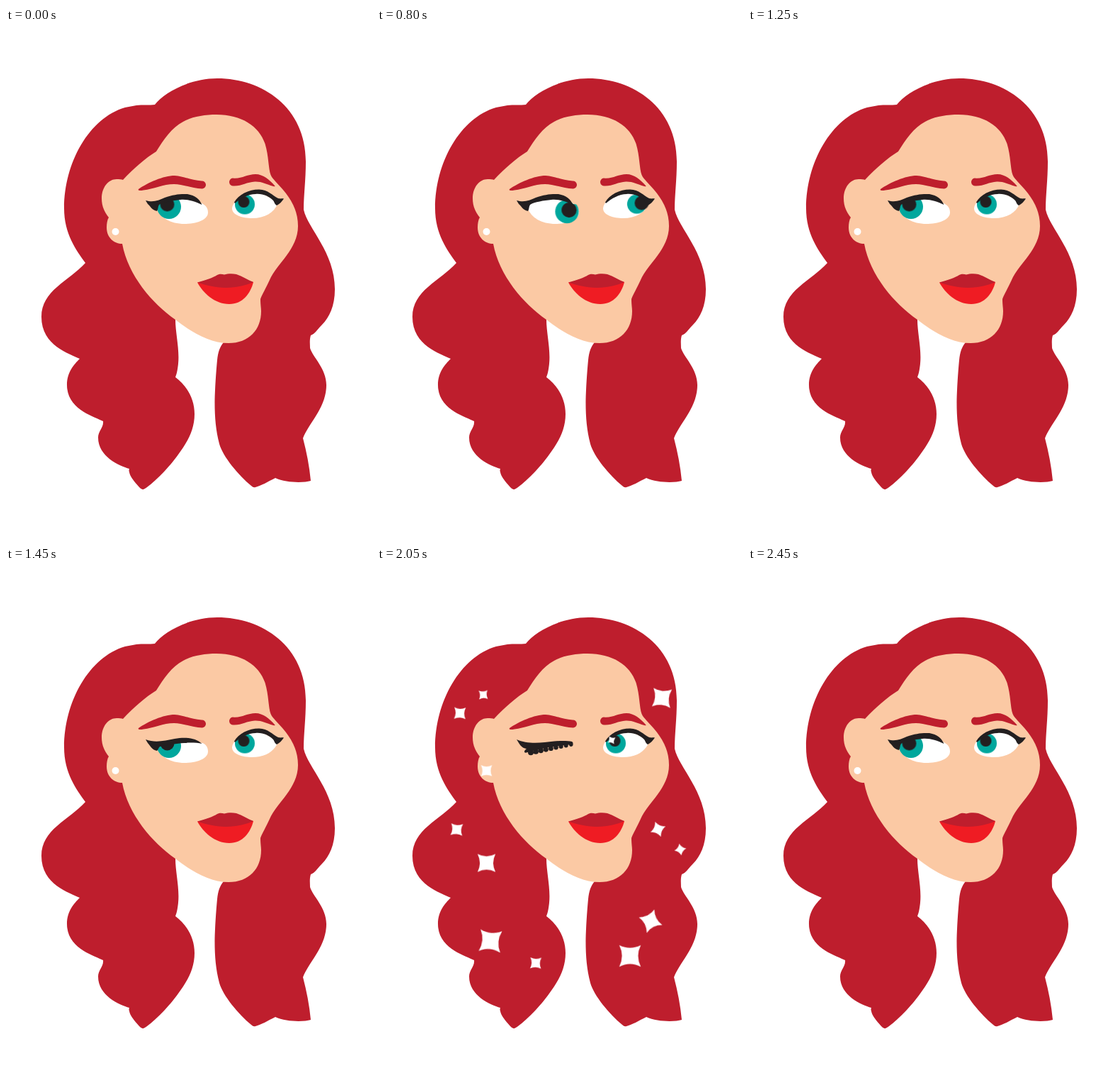
An HTML page that plays this animation: 515 px wide and 720 px high, repeating every 2.65 s.

```html
<!DOCTYPE html>
<html lang="en">
<head>
<meta charset="utf-8">
<title>Wink</title>
<style>
  html, body { margin: 0; width: 100%; height: 100%; overflow: hidden; background: #fff; }
  svg { display: block; width: 515px; height: 720px; }
  .hair { fill: #be1e2d; }
  .skin { fill: #fbc9a4; }
  .lip { fill: #ef1c23; }
  .ink { fill: #231f20; }
  .teal { fill: #00a79d; }
  .white { fill: #fff; }

  .look, .open, .half, .wink, .star { animation: 2650ms step-end infinite; }
  .look { animation-name: look; }
  .open { animation-name: open; }
  .half { animation-name: half; }
  .wink { animation-name: wink; }
  .star { animation-name: twinkle; }

  /* gaze positions: left, centre, between, right */
  #irisA  { --l: translate(230px,252px) scale(.85); --c: translate(241px,251px) scale(.85);
            --m: translate(254.5px,255px) scale(.84); --r: translate(268px,258.5px) scale(.83); }
  #pupilA { --l: translate(227.5px,248.5px) scale(.5); --c: translate(240.5px,248.5px) scale(.53);
            --m: translate(255.5px,252.5px) scale(.53); --r: translate(271px,256.5px) scale(.53); }
  #irisB  { --l: translate(337px,248.5px) scale(.7); --c: translate(347px,247.5px) scale(.7);
            --m: translate(356.5px,248px) scale(.69); --r: translate(366.5px,248px) scale(.68); }
  #pupilB { --l: translate(335.5px,245px) scale(.4); --c: translate(346.5px,243.5px) scale(.41);
            --m: translate(359px,245px) scale(.45); --r: translate(373.5px,246.5px) scale(.5); }

  @keyframes look {
    0%, 47.17%, 100%   { transform: var(--l); }
    18.868%, 41.509%   { transform: var(--c); }
    24.528%, 35.849%   { transform: var(--m); }
    30.189%            { transform: var(--r); }
  }
  @keyframes open {
    0%, 92.453%, 100% { visibility: visible; }
    54.717%           { visibility: hidden; }
  }
  @keyframes half {
    0%, 62.264%, 92.453%, 100% { visibility: hidden; }
    54.717%, 84.906%           { visibility: visible; }
  }
  @keyframes wink {
    0%, 84.906%, 100% { visibility: hidden; }
    62.264%           { visibility: visible; }
  }
  @keyframes twinkle {
    0%, 77.358%, 100% { transform: rotate(0deg); }
    69.811%           { transform: rotate(45deg); }
  }
</style>
</head>
<body>
<svg viewBox="0 0 515 720" xmlns="http://www.w3.org/2000/svg">
  <defs>
    <clipPath id="underA"><path d="M205 249C220 240 236 237 250 237.500C262 238 271 242 277 248L295 250V290H205Z"/></clipPath>
    <clipPath id="underB"><path d="M316 252C325 239 340 231 355 231C367 231 375 237 381 243L392 246V280H316Z"/></clipPath>
    <clipPath id="underHalf"><path d="M205 253C225 247 250 244 277 248L295 250V290H205Z"/></clipPath>
    <path id="whiteA" d="M213 254C217 267 232 276 252 276C272 276 285 269 285 260C285 253 281 249 275 246.500C262 238 240 239 225 242L214 249Z"/>
  </defs>

  <path class="hair" d="M210 108C222 92 258 71 298 71C362 71 423 112 423 188C423 215 420 235 420 256C426 283 464 316 464 368C464 392 456 408 446 418C440 424 436 431 430 433C428 440 429 446 429 451C433 464 452 480 452 503C452 535 427 557 419 578C424 597 428 617 430 638C420 641 395 641 380 634C370 639 360 645 352 647Q349 648 346 645C328 630 306 604 301 586C296 567 294.500 548 294.500 528C294.500 510 297 478 298 468C299 456 302 449 307 443L300 400H239V411C239 430 245 452 243 473C242 482 241 487 239 492C255 504 266 522 266 544C266 568 254 586 243 601C231 618 210 640 196 649Q192 652 188 647C181 639 175 632 174 626Q173 623 174 621C160 617 130 604 130 577C130 568 138 563 137 554C126 548 86 538 86 503C86 485 96 474 104 466C90 459 50 448 50 407C50 370 88 357 112 331C99 313 82 290 82 254C82 190 117 127 168 112C173 111 179 110 184 109C192 108 203 109 210 108Z"/>

  <path class="skin" d="M212 174C222 158 234 140 250 132C262 125 280 122 297 122C332 122 357 138 365.500 163C371 181 370 198 373.500 207C375 211 378 213 380 216C392 229 412 248 412 279C412 312 382 332 372 355C367 366 361 376 359 382C359 390 360 394 360 399C360 425 343 444 314 444C288 444 262 429 239 411C206 388 172 348 164 304C153 304 142 296 142 281C142 275 143 270 145 267C138 258 135 250 135 240C135 224 145 213 156 213C160 213 163 213 165 214C180 198 197 183 212 174Z"/>

  <g class="hair">
    <path d="M187 227C200 218 222 208 238 208C252 209 262 215 276 215.500A5.500 5.500 0 0 1 277 226.500C262 226 250 220 237 220C222 220 208 227 194 228.500Q185 230 187 227Z"/>
    <path d="M320 211.500C332 213 340 206 352 206C363 206 372 214 379 222Q381 224 377 223C367 220 360 216 351 216.500C340 217 332 223 321 222.500A5.500 5.500 0 0 1 320 211.500Z"/>
  </g>

  <path class="lip" d="M270 358.500C278 373 294 389 315 389C334 389 345 374 349 358L310 353Z"/>
  <path class="hair" d="M270 358.500C282 355 292 352 298 348C302 346 305 347 308 347.500C313 346 320 346 325 347C334 350 341 355 349 358C340 362 326 366 310 366C295 366 281 362 270 358.500Z"/>

  <circle class="white" cx="154.500" cy="287" r="5"/>

  <g class="open">
    <use href="#whiteA" class="white"/>
    <g clip-path="url(#underA)">
      <circle id="irisA" class="teal look" r="20"/>
      <circle id="pupilA" class="ink look" r="20"/>
    </g>
    <path class="ink" d="M197 243C208 246 215 243 224 239C236 234.500 246 233.500 256 234C267 236 273 241 276.500 249C266 244 256 241 246 242C236 243 222 245 216 249C214 252 215 255 213 258C206 257 203 250 200 248Z"/>
  </g>

  <g class="half">
    <g clip-path="url(#underHalf)">
      <use href="#whiteA" class="white"/>
      <circle class="teal" cx="230" cy="252" r="17"/>
      <circle class="ink" cx="227.500" cy="248.500" r="10"/>
    </g>
    <path class="ink" d="M197 243C210 248 224 245 238 242C254 239 268 241 276.500 249C262 246 240 248 217 253C215 255 215 257 213 259C206 258 203 251 200 248Z"/>
  </g>

  <g class="wink ink">
    <path d="M197 243C212 250 232 248 250 245.500C262 244.500 270 245 275 246Q278 248 275 250L262 251.500L240 254.500L215 260C207 264 206 260 211 256C203 255 201 249 197 243Z"/>
    <g id="lashes"></g>
  </g>

  <path class="white" d="M319 254C319 264 334 268 347 268C366 268 378 260 383 248C375 239 362 232 350 232C336 233 320 243 319 254Z"/>
  <g clip-path="url(#underB)">
    <circle id="irisB" class="teal look" r="20"/>
    <circle id="pupilB" class="ink look" r="20"/>
  </g>
  <path class="ink" d="M322 245.500C328 235 342 227.500 357 227.500C370 228 376 236 383 239.500C386 241 389 240 392 240.500C389 245 386 248 382 250C379 248 379 246 377 243C371 237 362 233 352 234C342 234 331 240 323 247Z"/>

  <g id="stars" class="wink white"></g>
</svg>
<script>
  const add = (parent, tag, attrs) => {
    const el = document.createElementNS('http://www.w3.org/2000/svg', tag);
    for (const k in attrs) el.setAttribute(k, attrs[k]);
    return parent.appendChild(el);
  };

  const lashes = document.getElementById('lashes');
  for (let i = 0; i < 9; i++) {
    add(lashes, 'circle', { cx: 217 + i * 7.1, cy: 261.3 - i * 1.4, r: 4 - i * 0.15 });
  }

  // x, y, half size, tilt
  const spots = [
    [357, 548, 15.2, 0], [386, 499, 12.2, -27], [160, 527, 15.2, 5], [154.500, 417, 12.6, 0],
    [224, 558, 7.8, 2], [112.500, 370, 8.3, 4], [117, 206, 8.1, 2], [150, 180, 6.2, -3],
    [402, 184.500, 13, 5], [396.500, 369.500, 8, 24], [428, 398, 6, 35],
    [154.500, 287, 7.8, 0], [331, 244, 4.6, 12]
  ];
  const stars = document.getElementById('stars');
  for (const [x, y, size, tilt] of spots) {
    const spot = add(stars, 'g', { transform: `translate(${x} ${y}) rotate(${tilt}) scale(${size / 20})` });
    add(spot, 'path', { class: 'star', d: 'M-20-20Q0-10 20-20Q10 0 20 20Q0 10-20 20Q-10 0-20-20Z' });
  }
</script>
</body>
</html>
```
